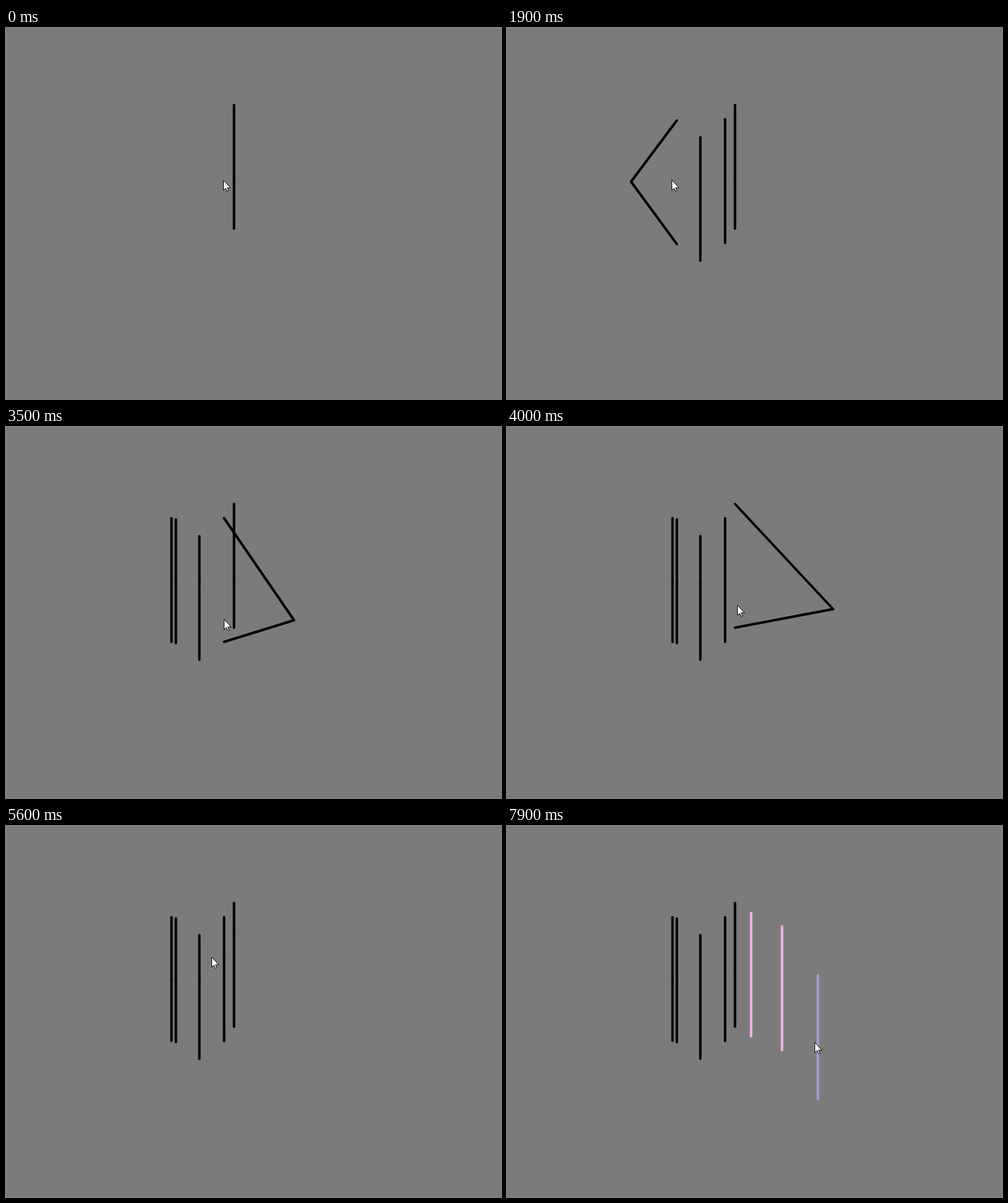
An HTML page with a canvas that plays this animation: 800x600 px, repeating every 8 s.

```html
<!DOCTYPE html>
<html lang="en">
<head>
<meta charset="utf-8">
<title>Plucked strings</title>
<style>
html, body { margin: 0; width: 100%; height: 100%; overflow: hidden; background: #7b7b7b; }
canvas { display: block; width: 800px; height: 600px; }
</style>
</head>
<body>
<canvas id="stage" width="800" height="600"></canvas>
<script>
const ctx = document.getElementById('stage').getContext('2d');
const TICK = 100, TICKS = 80, LENGTH = 200;
const BLACK = '#000', PINK = '#f5b2e6', BLUE = '#a0a0d8';

const mix = (a, b, u) => a + (b - a) * u;

// A pull bends the string sideways from one tick until it is let go at another.
const pull = (from, until, reach, y, rise = 2) => ({ from, until, reach, y, rise });
const touch = (from, y) => pull(from, from + 1, 0, y);
const string = (born, x, y, color, ...pulls) => ({ born, x, y, color, pulls });

const strings = [
  string(0, 368, 124, BLACK, touch(0, 242), pull(39, 42, 158.5, 294),
    pull(47, 50, 69.5, 188), pull(50, 53, 207, 165), touch(69, 238)),
  string(1, 352, 147, BLACK, touch(4, 250), pull(33, 37, 113, 312, 3),
    pull(43, 46, -79, 213), pull(57, 60, 56, 225), pull(60, 69, 100, 232, 8)),
  string(7, 312, 176, BLACK, pull(9, 11, -56, 283), pull(25, 28, 138.5, 252)),
  string(13, 274, 149, BLACK, pull(14, 16, -98, 249), pull(16, 22, -74, 248, 4),
    pull(23, 24, 56, 251, 1)),
  string(20, 267, 147, BLACK, pull(22, 23, 23, 249, 1)),
  string(69, 394, 140, PINK, touch(72, 243)),
  string(74, 444, 162, PINK, touch(75, 269)),
  string(79, 502, 241, BLUE)
];

// Pointer stops: [arrive, leave, x, y], with even motion in between.
const stops = [
  [0, 0, 351, 246], [2, 3, 348, 247], [4, 8, 311, 275], [12, 13, 273, 248],
  [15, 15, 268, 246], [19, 21, 266, 246], [25, 25, 314, 252], [27, 27, 325, 257],
  [30, 30, 334, 282], [33, 35, 352, 311], [40, 40, 372, 288], [44, 45, 345, 213],
  [48, 49, 363, 184], [51, 52, 370, 166], [54, 55, 338, 180], [56, 56, 332, 212],
  [58, 59, 346, 229], [60, 60, 343, 231], [64, 64, 349, 230], [67, 68, 352, 233],
  [69, 71, 393, 239], [72, 73, 443, 259], [74, 74, 443, 261], [77, 78, 501, 340],
  [79, 79, 497, 350]
];

const arrow = new Path2D('M.5 .5V16.5L4.2 13.2L6.4 18.3L8.7 17.3L6.6 12.4H11.6Z');

function pointerAt(n) {
  const i = stops.findLastIndex(s => s[0] <= n);
  const [, leave, x, y] = stops[i];
  if (n <= leave) return [x, y];
  const [arrive, nx, ny] = [stops[i + 1][0], ...stops[i + 1].slice(2)];
  const u = (n - leave) / (arrive - leave);
  return [Math.round(mix(x, nx, u)), Math.round(mix(y, ny, u))];
}

// Middle of the string: a pull that follows another at once starts from its bend.
function middle({ x, y, pulls }, n) {
  const i = pulls.findLastIndex(p => p.from <= n);
  if (i < 0) return [x, y + LENGTH / 2];
  const p = pulls[i], last = pulls[i - 1];
  if (n >= p.until) return [x, p.y];
  const start = last && last.until === p.from ? last : { reach: 0, y: p.y };
  const u = Math.min(1, (n - p.from + 1) / p.rise);
  return [x + mix(start.reach, p.reach, u), mix(start.y, p.y, u)];
}

function segment(x1, y1, x2, y2) {
  ctx.beginPath();
  ctx.moveTo(x1 + 0.5, y1 + 0.5);
  ctx.lineTo(x2 + 0.5, y2 + 0.5);
  ctx.stroke();
}

function drawString(s, n) {
  if (n < s.born) return;
  const [mx, my] = middle(s, n);
  ctx.strokeStyle = s.color;
  ctx.lineWidth = 4;
  ctx.lineCap = 'round';
  segment(s.x, s.y, mx, my);
  segment(mx, my, s.x, s.y + LENGTH);
}

function drawPointer(n) {
  ctx.save();
  ctx.translate(...pointerAt(n));
  ctx.fillStyle = '#fff';
  ctx.strokeStyle = '#000';
  ctx.lineWidth = 1;
  ctx.fill(arrow);
  ctx.stroke(arrow);
  ctx.restore();
}

function draw(n) {
  ctx.fillStyle = '#7b7b7b';
  ctx.fillRect(0, 0, 800, 600);
  for (const s of strings) drawString(s, n);
  drawPointer(n);
}

const start = performance.now();
function loop() {
  const elapsed = Math.max(0, performance.now() - start);
  draw(Math.floor(elapsed / TICK) % TICKS);
  requestAnimationFrame(loop);
}
loop();
</script>
</body>
</html>
```
